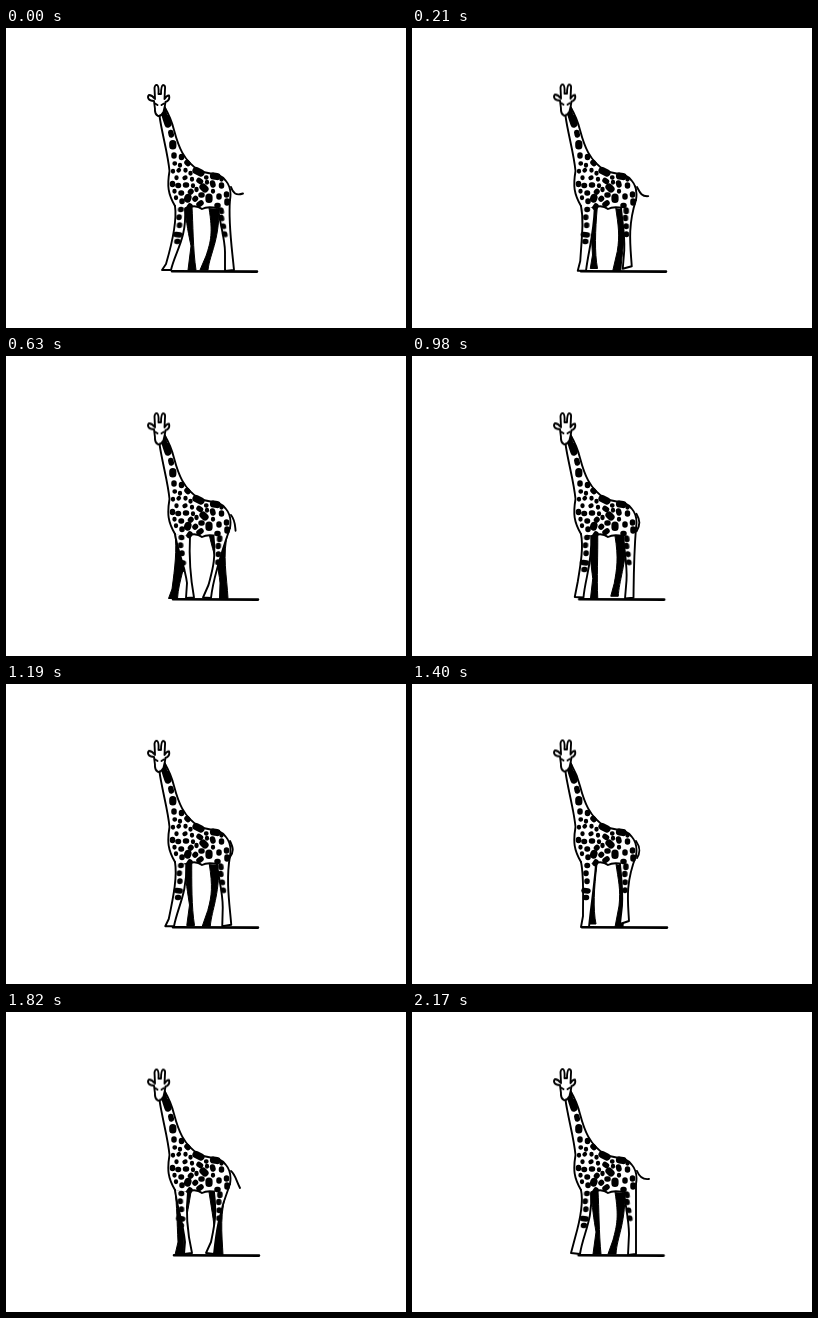
Recreate the animation shown at these times as an HTML page without scripts. Size 400 px wide and 300 px high, loop 2.24 s.

```html
<!DOCTYPE html>
<html lang="en">
<head>
<meta charset="utf-8">
<title>Walking giraffe</title>
<style>
html, body { margin: 0; width: 100%; height: 100%; overflow: hidden; background: #fff; }
svg { display: block; width: 100%; height: 100%; }
path { fill: none; stroke: #000; stroke-width: 1.9; stroke-linecap: round; stroke-linejoin: round; }
.far { fill: #000; stroke-width: 1; }
.near, .skin, .face { fill: #fff; }
.skin { stroke: none; }
.ground { stroke-width: 2.6; }
.large { stroke-width: 7.2; }
.medium { stroke-width: 5.5; }
.small { stroke-width: 4.3; }

/* One stride lasts 16 drawings, one tail swing 32. */
.near, .far, .walk { animation: 1120ms infinite; }
.front.near { animation-name: front-near; }
.front.far { animation-name: front-far; }
.hind.near { animation-name: hind-near; }
.hind.far { animation-name: hind-far; }
.front.walk { animation-name: front-skew; transform-origin: 174px 176px; }
.hind.walk { animation-name: hind-skew; transform-origin: 212px 176px; }
.ground { animation-name: ground; }
.head { animation-name: bob; }
.tail { animation: tail 2240ms infinite; }

@keyframes front-near {
  0%, 100% { d: path("M169 178 C171 192 167 212 160 236 L156 242 L165 242 C169 224 181 210 179 181"); animation-timing-function: steps(4); }
  25% { d: path("M169 178 C172 192 171 205 171 232 L169 243 L177 243 C179 222 182 205 184 180"); animation-timing-function: steps(2); }
  37.5% { d: path("M169 178 C171 195 175 210 177 232 L177 242 L184 242 C184 222 185 200 184 180"); animation-timing-function: steps(2); }
  50% { d: path("M169 178 C172 195 181 210 183 224 L182 242 L190 242 C187 222 187 195 186 180"); animation-timing-function: steps(2); }
  62.5% { d: path("M169 178 C171 195 177 210 179 230 L178 242 L186 241 C183 228 179 205 182 180"); animation-timing-function: steps(1); }
  68.75% { d: path("M169 178 C171 192 172 205 174 225 L174 241 L182 240 C179 225 178 205 180 180"); animation-timing-function: steps(4); }
  93.75% { d: path("M169 178 C172 192 167 212 163 226 L159 241 L168 242 C171 222 181 208 179 181"); animation-timing-function: steps(1); }
}
@keyframes front-far {
  0%, 100% { d: path("M179 178 C180 195 183 208 185 218 L182 242 L190 242 C187 222 187 195 186 179"); animation-timing-function: steps(4); }
  25% { d: path("M176 180 C178 200 179 220 179 230 L177 240 L184 240 C181 225 182 205 185 180"); animation-timing-function: steps(2); }
  37.5% { d: path("M169 178 C171 195 171 210 170 232 L170 243 L177 243 C177 225 180 195 182 180"); animation-timing-function: steps(2); }
  50% { d: path("M169 178 C171 192 167 212 160 236 L156 242 L165 242 C169 224 181 210 180 181"); animation-timing-function: steps(2); }
  62.5% { d: path("M169 178 C171 195 171 210 172 230 L169 243 L178 243 C176 225 181 205 185 180"); animation-timing-function: steps(1); }
  68.75% { d: path("M169 178 C170 195 170 210 171 230 L171 243 L176 243 C178 225 183 205 185 180"); animation-timing-function: steps(4); }
  93.75% { d: path("M179 178 C180 195 182 208 184 220 L181 242 L189 242 C187 222 187 195 186 179"); animation-timing-function: steps(1); }
}
@keyframes hind-near {
  0%, 100% { d: path("M212 179 C213 192 219 210 219 224 L219 243 L228 242 C226 220 222 195 224 172"); animation-timing-function: steps(4); }
  25% { d: path("M208 180 C209 192 211 205 210 222 L208 240 L217 237 C216 218 213 200 224 172"); animation-timing-function: steps(2); }
  37.5% { d: path("M208 180 C210 200 205 215 204 230 L202 241 L209 241 C209 220 215 200 224 172"); animation-timing-function: steps(2); }
  50% { d: path("M207 180 C209 204 205 212 200 228 L194 242 L202 242 C204 225 214 204 224 172"); animation-timing-function: steps(2); }
  62.5% { d: path("M208 180 C211 205 208 215 205 230 L200 241 L208 242 C210 222 213 200 224 172"); animation-timing-function: steps(1); }
  68.75% { d: path("M209 180 C209 200 211 212 207 232 L204 241 L214 241 C215 222 215 200 224 172"); animation-timing-function: steps(4); }
  93.75% { d: path("M212 179 C213 192 217 208 217 222 L216 243 L224 242 C224 220 224 200 224 172"); animation-timing-function: steps(1); }
}
@keyframes hind-far {
  0%, 100% { d: path("M203 180 C207 205 205 213 200 228 L194 242 L202 242 C204 225 213 214 213 181"); animation-timing-function: steps(4); }
  25% { d: path("M204 180 C206 195 209 205 207 222 L203 243 L211 243 C212 225 214 205 212 182"); animation-timing-function: steps(2); }
  37.5% { d: path("M203 180 C206 200 210 215 209 230 L209 243 L216 243 C217 222 214 200 222 176"); animation-timing-function: steps(2); }
  50% { d: path("M204 180 C209 195 217 210 219 224 L219 243 L227 242 C226 220 219 198 222 176"); animation-timing-function: steps(2); }
  62.5% { d: path("M203 180 C206 200 209 215 209 230 L208 243 L217 243 C216 222 213 200 222 176"); animation-timing-function: steps(1); }
  68.75% { d: path("M203 180 C206 195 204 215 206 225 L207 235 L213 235 C214 222 214 200 222 176"); animation-timing-function: steps(4); }
  93.75% { d: path("M203 180 C207 205 205 213 201 228 L196 242 L204 242 C205 225 213 214 213 181"); animation-timing-function: steps(1); }
}
@keyframes front-skew {
  0%, 100% { transform: skewX(-4deg); animation-timing-function: steps(4); }
  25% { transform: skewX(0deg); animation-timing-function: steps(4); }
  50% { transform: skewX(4deg); animation-timing-function: steps(3); }
  68.75% { transform: skewX(0deg); animation-timing-function: steps(5); }
}
@keyframes hind-skew {
  0%, 100% { transform: skewX(10deg); animation-timing-function: steps(4); }
  25% { transform: skewX(-1deg); animation-timing-function: steps(4); }
  50% { transform: skewX(-5deg); animation-timing-function: steps(3); }
  68.75% { transform: skewX(1deg); animation-timing-function: steps(5); }
}
@keyframes ground {
  0%, 100% { transform: none; animation-timing-function: steps(4); }
  25% { transform: translateX(4px); animation-timing-function: steps(4); }
  50% { transform: translateX(0); animation-timing-function: steps(3); }
  68.75% { transform: translateX(3px); animation-timing-function: steps(5); }
}
@keyframes bob {
  0%, 100% { transform: none; animation-timing-function: steps(4); }
  25% { transform: translateY(-.6px); animation-timing-function: steps(7); }
  68.75% { transform: translateY(.7px); animation-timing-function: steps(5); }
}
@keyframes tail {
  0%, 100% { d: path("M225 159 C227 165 230 168 237 165.500"); animation-timing-function: steps(4); }
  12.5% { d: path("M225 159 C228 164 229 169 236 169"); animation-timing-function: steps(7); }
  34.375% { d: path("M225 159 C230 165 229 170 227 177"); animation-timing-function: steps(5); }
  50% { d: path("M224 157 C227 164 228 168 223 174"); animation-timing-function: steps(6); }
  68.75% { d: path("M224 157 C229 163 229 168 226 174"); animation-timing-function: steps(4); }
  81.25% { d: path("M225 159 C229 162 230 168 234 176"); animation-timing-function: steps(5); }
  96.875% { d: path("M225 159 C227 164 230 168 237 167"); animation-timing-function: steps(1); }
}
</style>
</head>
<body>
<svg viewBox="0 0 400 300">
  <path class="ground walk" d="M166 243.300L251 243.600"/>
  <path class="tail"/>
  <path class="hind far"/>
  <path class="front far"/>

  <path class="skin" d="M153.500 88C156 106 162 126 163.500 143C161 158 162 166 169 178L184 180Q190 177 196 181L206 179L224 172Q226 160 220 153C214 144 204 147 194 143C177 133 172 117 168 102Q165 90 158.500 79Z"/>
  <path d="M153.500 88C156 106 162 126 163.500 143C161 158 162 166 169 178"/>
  <path d="M158.500 79Q165 90 168 102C172 117 177 133 194 143C204 147 214 144 220 153Q226 160 224 172"/>
  <path d="M180 180Q190 176 196 181Q201 178 211 180"/>

  <path class="hind near"/>
  <path class="front near"/>

  <!-- coat -->
  <path class="large" d="M160 90L162 96M166.800 115.500v2.500M190 142.500L195 145M207.500 148L211 148.500M197 159L199 161M203 169v2.500M182 169.500L181.500 171"/>
  <path class="medium" d="M157.500 81L158.500 88M164.800 104.500l.5 2.500M168 127v1M175.500 128.500v1M181 134.500l1 1M179.500 157h1M172 157.500h.5M193 152.500l1.500 1M184.500 164l.5-.5M175 165h.5M206.500 155l.5 2M215.500 157v1M220.500 166v1M195 167h1M189 171l.5-.5M176 173v.5M213 168v1M184 178l-1 1.500M195 175l-2 1.500M211 177.500h1M166.500 155.500v1M221 173v2"/>
  <path class="small" d="M168.500 135.500h.5M174 137v.5M167 143v.5M172.500 142.500l.5-.5M179.500 142v.5M184.500 145v.5M178.500 150l1-.5M170.500 149.500v.5M186 151v.5M200 149.500h.5M215.500 151v.5M187 157.500v.5M201 154v.5M190.500 161v1M207 163v.5M168.500 163v.5M170 169.500v.5"/>

  <g class="front walk">
    <path class="medium" d="M175 181.500h.5M174 189v.5M175 197v.5M172 206.500l4 .5M173.500 213.500h1"/>
  </g>
  <g class="hind walk">
    <path class="medium" d="M214 182v1.500M213 189.500v1M213.500 198v.5M213.500 206v.5"/>
  </g>

  <g class="head walk">
    <path class="face" d="M148 73C142 73 141 69 143 67Q146 67 149 71L148.500 60Q149 56.500 151 57Q153 58 152.500 66H155Q155 58 157 57Q159.500 57 159 61L158.500 71Q161 67 163 67.500C164 71 162 73 159.500 74Q159 78 157.500 84Q155 88.500 152 88Q148.500 86 149 81Z"/>
    <path d="M149 75.500l2.500 1.500M158 75.500l-2.500 1.500"/>
  </g>
</svg>
</body>
</html>
```
